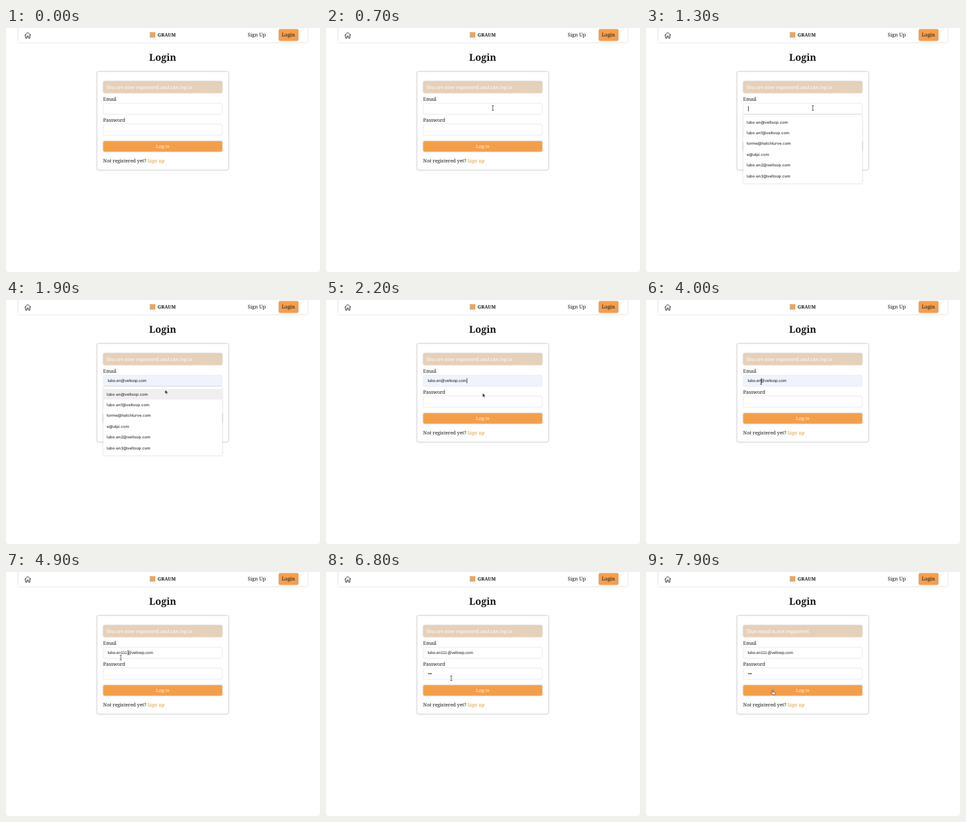
These frames come from a looping animation (480x372 px, 8 s). An HTML page:

```html
<!DOCTYPE html>
<html lang="en">
<head>
<meta charset="utf-8">
<title>Login</title>
<style>
  html, body { margin: 0; width: 480px; height: 372px; overflow: hidden; }
  html { background: #f3f3f3; }
  body { position: relative; background: #fff; border-radius: 0 0 5px 5px; text-rendering: geometricPrecision; }
  svg { position: absolute; left: 0; top: 0; }

  .serif { font: 7.35px "Noto Serif", serif; fill: #151515; }
  .nav { font-size: 7.6px; }
  .brand { font-size: 7.1px; font-weight: 700; }
  .title { font-size: 14.6px; font-weight: 700; text-anchor: middle; }
  .white { fill: #fff; }
  .link { fill: #dc9a50; }
  .submit { font: 7.3px "Liberation Sans", Arial, sans-serif; fill: #fff; text-anchor: middle; }
  .orange { fill: #f59e4a; }
  .tan { fill: #e5d0b9; }
  .input { fill: #fff; stroke: #e6e6e6; stroke-width: .8; }
  .card { fill: #fff; stroke: #dadada; stroke-width: .8; }
  .lift { filter: drop-shadow(0 .6px 1px rgba(0, 0, 0, .22)); }
  .menu-text { font: 500 6px Inter, sans-serif; fill: #333; }

  .field { position: absolute; left: 155.6px; height: 17px; font: 6.1px "Liberation Sans", Arial, sans-serif; color: #151515; }
  .field, .mail { display: flex; align-items: center; white-space: nowrap; }
  .field span { flex: none; }
  .clip { overflow: hidden; width: 0; }
  .caret { position: relative; width: 0; height: 8px; }
  .caret::before { content: ""; position: absolute; left: 0; top: 0; width: 1px; height: 8px; background: #555; }

  /* 100 ms is 1.25 % of the loop */
  .a, .clip, .cursor { animation: 8s step-end -30ms infinite; }
  .a { opacity: 0; }

  .menu { animation-name: menu; }
  .hover { animation-name: hover; }
  .filled { animation-name: filled; }
  .mail { animation-name: mail; }
  .ones { animation-name: ones; }
  .dots { animation-name: dots; }
  .c-start { animation-name: c-start; }
  .c-end { animation-name: c-end; }
  .c-mid { animation-name: c-mid; }
  .c-pass { animation-name: c-pass; }
  .welcome { animation-name: welcome; }
  .error { animation-name: error; }
  .arrow { animation-name: arrow; }
  .beam { animation-name: beam; }
  .hand { animation-name: hand; }
  .cursor { animation-name: cursor; }

  @keyframes menu { 16.25% { opacity: 1 } 27.5% { opacity: 0 } }
  @keyframes hover { 22.5% { opacity: 1 } 27.5% { opacity: 0 } }
  @keyframes filled { 22.5% { opacity: 1 } 53.75% { opacity: 0 } }
  @keyframes mail { 22.5% { opacity: 1 } }
  @keyframes ones { 53.75% { width: 1ch } 56.25% { width: 2ch } 58.75% { width: 3ch } }
  @keyframes dots { 71.25% { width: .7em } 73.75% { width: 1.05em } }
  @keyframes c-start { 16.25% { opacity: 1 } 22.5% { opacity: 0 } }
  @keyframes c-end { 27.5%, 40% { opacity: 1 } 33.75%, 46.25% { opacity: 0 } }
  @keyframes c-mid { 50% { opacity: 1 } 65% { opacity: 0 } }
  @keyframes c-pass { 65%, 86.25% { opacity: 1 } 80%, 92.5% { opacity: 0 } }
  @keyframes welcome { 0% { opacity: 1 } 98.75% { opacity: 0 } }
  @keyframes error { 98.75% { opacity: 1 } }
  @keyframes arrow { 1.25%, 22.5%, 86.25% { opacity: 1 } 7.5%, 43.75%, 87.5% { opacity: 0 } }
  @keyframes beam { 7.5%, 43.75%, 61.25% { opacity: 1 } 22.5%, 53.75%, 86.25% { opacity: 0 } }
  @keyframes hand { 87.5% { opacity: 1 } }

  /* the pointer is sampled ten times a second */
  @keyframes cursor {
    0% { transform: translate(238px, 400px) }
    1.25% { transform: translate(238px, 400px); animation-timing-function: steps(7, start) }
    10% { transform: translate(255px, 122px) }
    21.25% { transform: translate(255px, 122px); animation-timing-function: steps(4, start) }
    26.25% { transform: translate(239.5px, 142px) }
    37.5% { transform: translate(239.5px, 142px); animation-timing-function: steps(9, start) }
    48.75% { transform: translate(176px, 125px) }
    61.25% { transform: translate(175.5px, 130.5px) }
    62.5% { transform: translate(175.5px, 130.5px); animation-timing-function: steps(3, start) }
    66.25% { transform: translate(176px, 146.5px) }
    82.5% { transform: translate(176px, 146.5px); animation-timing-function: steps(3, start) }
    86.25% { transform: translate(191.5px, 162px); animation-timing-function: steps(3, start) }
    90%, 100% { transform: translate(193.6px, 180px) }
  }
</style>
</head>
<body>

<svg class="serif" width="480" height="372" viewBox="0 0 480 372">
  <rect class="lift" x="18.5" y="-4" width="442.5" height="26" rx="2" fill="#fff"/>
  <path d="M28.4 11.2 33.2 6.7 38 11.2M29.9 10.2v5.2h2.2v-3h2.2v3h2.2v-5.2" fill="none" stroke="#222" stroke-width=".9" stroke-linejoin="round"/>
  <rect x="219.8" y="6.3" width="8.4" height="8.4" fill="#e2a95f"/>
  <text class="brand" x="231.8" y="13.2">GRAUM</text>
  <text class="nav" x="369.5" y="13.2">Sign Up</text>
  <rect class="orange lift" x="417" y="1.8" width="30" height="17.6" rx="2"/>
  <text class="nav" x="421.4" y="13.2">Login</text>

  <text class="title" x="239.5" y="49.5">Login</text>
  <rect class="card lift" x="139.2" y="66.6" width="200.8" height="149.8" rx="2.5"/>
  <rect class="tan lift" x="148.6" y="81" width="182" height="18" rx="2"/>
  <text class="white a welcome" x="153.2" y="92.6">You are now registered and can log in</text>
  <text class="white a error" x="153.2" y="92.6">That email is not registered</text>

  <text x="148.6" y="110.7">Email</text>
  <rect class="input" x="148.8" y="114.6" width="181.6" height="17" rx="2"/>
  <rect class="a filled" x="149.2" y="115" width="180.8" height="16.2" rx="1.6" fill="#eef3fe"/>
  <text x="148.6" y="142.8">Password</text>
  <rect class="input" x="148.8" y="146.6" width="181.6" height="17" rx="2"/>

  <rect class="orange lift" x="148.6" y="172.4" width="182" height="16" rx="2"/>
  <text class="submit" x="239.6" y="183">Log in</text>
  <text x="148.6" y="205">Not registered yet? <tspan class="link">Sign up</tspan></text>
</svg>

<div class="field" style="top: 114.6px">
  <i class="caret a c-start"></i>
  <div class="mail a">
    <span>lubo.en</span><span class="clip ones">111</span><i class="caret a c-mid"></i><span>@veltoop.com</span><i class="caret a c-end"></i>
  </div>
</div>
<div class="field" style="top: 146.6px">
  <span class="clip dots">•••</span><i class="caret a c-pass"></i>
</div>

<svg width="480" height="372" viewBox="0 0 480 372">
  <g class="a menu menu-text">
    <rect class="lift" x="148.6" y="132" width="182" height="105" rx="1" fill="#fff"/>
    <rect class="a hover" x="148.6" y="135.6" width="182" height="16.2" fill="#efefef"/>
    <text x="154" y="145.7">lubo.en@veltoop.com</text>
    <text x="154" y="162.1">lubo.en1@veltoop.com</text>
    <text x="154" y="178.4">torme@hatchlurve.com</text>
    <text x="154" y="194.8">e@ulpi.com</text>
    <text x="154" y="211.1">lubo.en2@veltoop.com</text>
    <text x="154" y="227.5">lubo.en3@veltoop.com</text>
  </g>
  <g class="cursor">
    <path class="a arrow" d="M0 0v6l1.4-1.2.9 2 .9-.4-.9-2h1.9z" fill="#111" stroke="#fff" stroke-width=".4"/>
    <path class="a beam" d="M-1.4-3.5h2.8M0-3.5v7M-1.4 3.5h2.8" fill="none" stroke="#333" stroke-width=".8"/>
    <path class="a hand" d="M-.6 4V.6a.7.7 0 0 1 1.4 0V3l2.6.6q.9.3.7 1.3L3.5 7H.4L-2 4.4q-.2-1 .9-.6z" fill="#fff" stroke="#222" stroke-width=".6"/>
  </g>
</svg>

</body>
</html>
```
